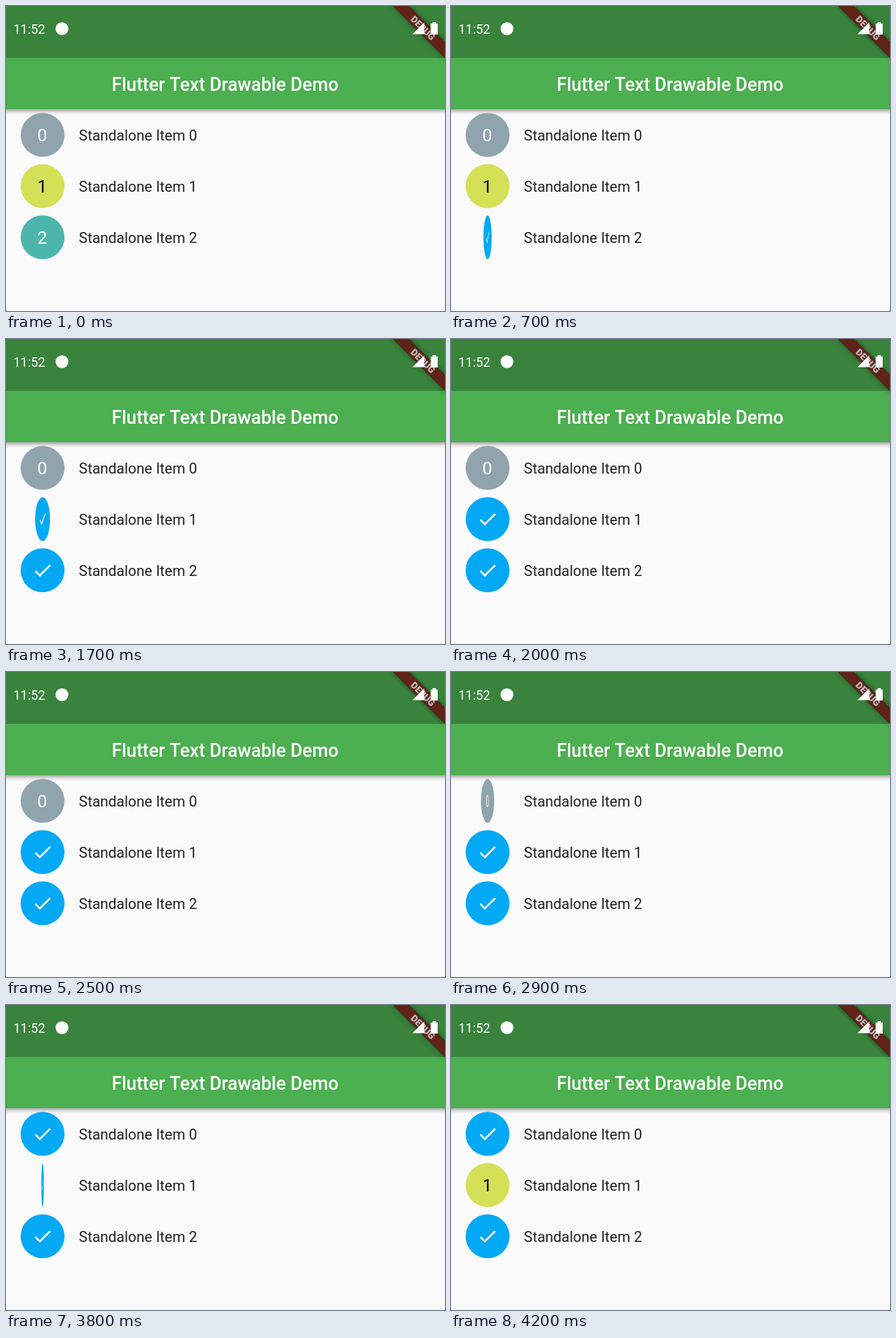
Write an HTML page with a canvas that moves like this. It is 600 px wide and 417 px high and loops after 4300 ms.

```html
<!DOCTYPE html>
<html lang="en">
<head>
<meta charset="utf-8">
<title>Flutter Text Drawable Demo</title>
<style>
  html, body { margin: 0; width: 100%; height: 100%; overflow: hidden; background: #fafafa; }
  canvas { display: block; }
</style>
</head>
<body>
<canvas id="stage" width="600" height="417"></canvas>
<script>
const ctx = document.getElementById('stage').getContext('2d');
const LOOP = 4300;
const FLIP = 500;
const BLUE = '#03a9f4';
const CHECK = new Path2D('M9 16.17L4.83 12l-1.42 1.41L9 19 21 7l-1.41-1.41z');

// Each entry of flips is the time at which the badge starts to turn over.
const items = [
  { color: '#90a4ae', ink: '#fff', flips: [2700] },
  { color: '#d4e157', ink: '#000', flips: [1396, 3560] },
  { color: '#4db6ac', ink: '#fff', flips: [421] }
];

function text(str, x, y, font, color, align = 'left') {
  ctx.font = font + ' Roboto, sans-serif';
  ctx.fillStyle = color;
  ctx.textAlign = align;
  ctx.fillText(str, x, y);
}

function disc(x, y, r, color) {
  ctx.fillStyle = color;
  ctx.beginPath();
  ctx.arc(x, y, r, 0, Math.PI * 2);
  ctx.fill();
}

function shape(points, color) {
  ctx.fillStyle = color;
  ctx.beginPath();
  points.forEach(p => ctx.lineTo(p[0], p[1]));
  ctx.fill();
}

function withShadow(color, blur, dy, draw) {
  ctx.save();
  ctx.shadowColor = color;
  ctx.shadowBlur = blur;
  ctx.shadowOffsetY = dy;
  draw();
  ctx.restore();
}

function drawBanner() {
  ctx.save();
  ctx.translate(600, 0);
  ctx.rotate(Math.PI / 4);
  withShadow('rgba(0,0,0,0.5)', 7, 0, () => {
    ctx.fillStyle = '#000';
    ctx.fillRect(-50, 35, 100, 15);
  });
  ctx.fillStyle = '#812f20';
  ctx.fillRect(-50, 35, 100, 15);
  text('DEBUG', 0, 47, '900 12.75px', '#fff', 'center');
  ctx.restore();
}

function drawBars() {
  withShadow('rgba(0,0,0,0.45)', 6, 2, () => {
    ctx.fillStyle = '#4caf50';
    ctx.fillRect(-20, -20, 640, 161);
  });
  text('Flutter Text Drawable Demo', 299.5, 116, '500 25px', '#fff', 'center');
  drawBanner();

  ctx.fillStyle = 'rgba(0,0,0,0.25)';
  ctx.fillRect(0, 0, 600, 71);
  text('11:52', 10, 37.5, '17.5px', '#fff');
  disc(76.5, 31, 8.8, '#fff');
  shape([[555.5, 38.5], [571.5, 22.5], [571.5, 38.5]], '#fff');
  ctx.fillRect(580.5, 24, 9.5, 15);
  ctx.fillRect(583, 22, 4.5, 2);
}

function flipState(flips, t) {
  let checked = false, scale = 1;
  for (const start of flips) {
    const p = Math.min(1, Math.max(0, (t - start) / FLIP));
    if (p >= 0.5) checked = !checked;
    if (p > 0 && p < 1) scale = Math.abs(Math.cos(Math.PI * p));
  }
  return { checked, scale };
}

function drawItem(item, i, t) {
  const y = 176.3 + i * 70;
  const { checked, scale } = flipState(item.flips, t);
  ctx.save();
  ctx.translate(50, y);
  ctx.scale(Math.max(scale, 0.001), 1);
  disc(0, 0, 30, checked ? BLUE : item.color);
  if (checked) {
    ctx.scale(1.25, 1.25);
    ctx.translate(-12, -12);
    ctx.fillStyle = '#fff';
    ctx.fill(CHECK);
  } else {
    text(String(i), -0.5, 8.7, '24px', item.ink, 'center');
  }
  ctx.restore();
  text('Standalone Item ' + i, 99.5, y + 7.2, '20px', '#212121');
}

function frame(now) {
  const t = now % LOOP;
  ctx.fillStyle = '#fafafa';
  ctx.fillRect(0, 0, 600, 417);
  drawBars();
  items.forEach((item, i) => drawItem(item, i, t));
  requestAnimationFrame(frame);
}
frame(performance.now());
</script>
</body>
</html>
```
